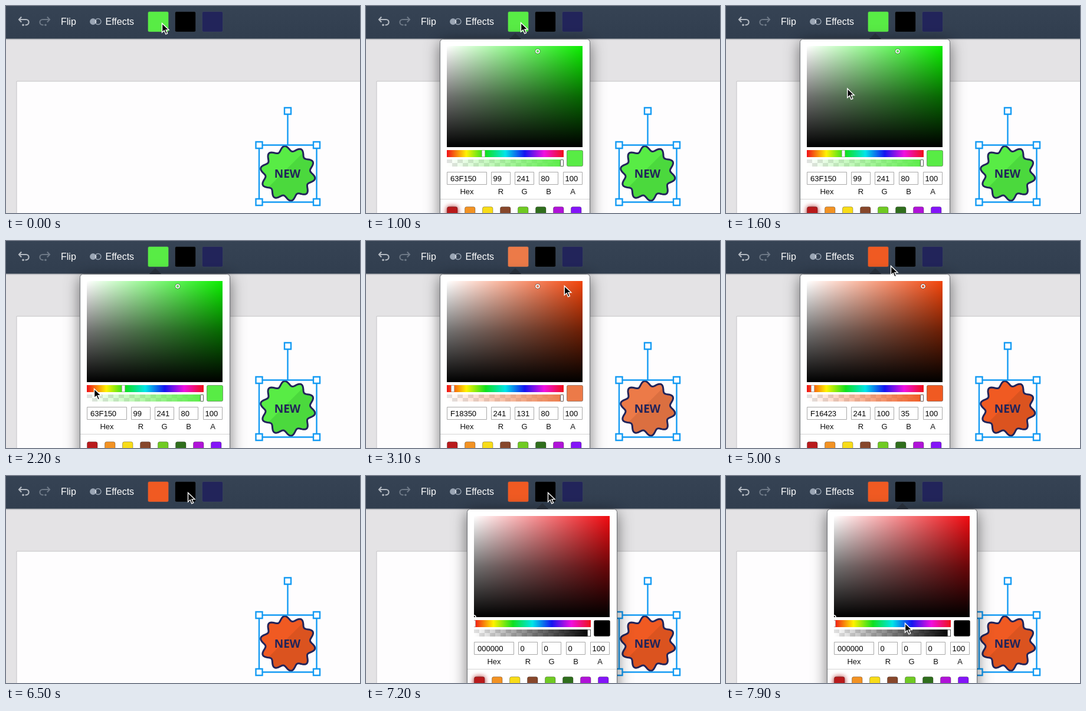
Animation, 600 px wide and 352 px high, one loop 8000 ms. Source, as an HTML page with a canvas:

```html
<!DOCTYPE html>
<html lang="en">
<head>
<meta charset="utf-8">
<title>Colour picker</title>
<style>
html, body { margin: 0; width: 100%; height: 100%; overflow: hidden; background: #e4e3e5; }
canvas { display: block; }
</style>
</head>
<body>
<canvas id="stage" width="600" height="352"></canvas>
<script>
const c = document.getElementById('stage').getContext('2d');
const LOOP = 8000, SANS = '"Liberation Sans", Arial, sans-serif';
const NAVY = '#22245a', BLUE = '#129af3';

// Pointer stops: time, x, y
const path = [
  [0, 264, 29], [200, 264, 29], [500, 262, 28], [1200, 262, 28], [2000, 149, 251],
  [2500, 149, 251], [3050, 336, 76], [3300, 334, 76], [4200, 334, 76], [4900, 279, 42],
  [5500, 279, 42], [6300, 308, 28], [7300, 308, 28], [7900, 303, 250], [8000, 303, 250]
];

// Colour states: hex shown, rgb, painted fill, shaded fill, pure hue, ring and hue thumb
const green = { hex: '63F150', rgb: [99, 241, 80], fill: '#58ec45', shade: '#4bd93d',
  hue: '#0cee00', ring: [154, 9], thumb: 62 };
const peach = { hex: 'F18350', rgb: [241, 131, 80], fill: '#ec7a48', shade: '#db6f40',
  hue: '#f2440a', ring: [154, 9], thumb: 10 };
const orange = { hex: 'F16423', rgb: [241, 100, 35], fill: '#f05a22', shade: '#db531f',
  hue: '#f2440a', ring: [197, 9], thumb: 10 };
const black = { hex: '000000', rgb: [0, 0, 0], fill: '#000', hue: '#f00a10', ring: [0, 172], thumb: 0 };
const presets = ['#b91a1c', '#f29223', '#f8dc18', '#87472b', '#6fca22', '#2f6e1c', '#b012d8', '#8414f8'];

function box(x, y, w, h, fill, stroke, r = 0, line = 1) {
  c.beginPath();
  c.roundRect(x, y, w, h, r);
  if (fill) { c.fillStyle = fill; c.fill(); }
  if (stroke) { c.strokeStyle = stroke; c.lineWidth = line; c.stroke(); }
}

function label(s, x, y, size, fill, align = 'left', font = SANS) {
  c.font = size + 'px ' + font;
  c.textAlign = align;
  c.fillStyle = fill;
  c.fillText(s, x, y);
}

function ramp(x0, y0, x1, y1, colours) {
  const g = c.createLinearGradient(x0, y0, x1, y1);
  colours.forEach((k, i) => g.addColorStop(i / (colours.length - 1), k));
  return g;
}

function svg(d, stroke, line, fill) {
  const p = new Path2D(d);
  c.lineWidth = line;
  c.strokeStyle = stroke;
  if (fill) { c.fillStyle = fill; c.fill(p); }
  c.stroke(p);
}

function circle(x, y, r, stroke, line, fill) {
  c.beginPath();
  c.arc(x, y, r, 0, 7);
  if (fill) { c.fillStyle = fill; c.fill(); }
  if (stroke) { c.strokeStyle = stroke; c.lineWidth = line; c.stroke(); }
}

function undo(colour) {
  svg('M26.2 18.5L22 23L26.2 27.5M22.5 23H34A4.6 4.6 0 0 1 34 32.2H32.5', colour, 2.1);
  circle(29, 32.2, 1.8, null, 0, colour);
}

function effects() {
  circle(147.5, 26.5, 5.4, null, 0, '#9aa5b4');
  circle(156, 26.5, 5, '#9aa5b4', 1.3, '#354253');
  c.save();
  c.beginPath();
  c.arc(156, 26.5, 5, 0, 7);
  c.clip();
  circle(147.5, 26.5, 5.4, '#9aa5b4', 1.3);
  c.restore();
  svg('M151.8 24V29', '#e1e5ea', 1.4);
}

function toolbar(main) {
  box(0, 55, 600, 3, ramp(0, 55, 0, 58, ['#8c9097', '#e4e3e5']));
  box(0, 0, 600, 55.5, ramp(0, 0, 0, 55, ['#364354', '#313e4f']));
  undo('#b4bac2');
  c.save();
  c.translate(96, 0);
  c.scale(-1, 1);
  undo('#6d7886');
  c.restore();
  label('Flip', 93, 32, 16, '#fff');
  label('Effects', 168.5, 32, 16, '#fff');
  effects();
  [main, '#000', NAVY].forEach((k, i) =>
    box(240.5 + i * 46, 9.5, 35, 34.5, k, 'rgba(70,80,95,.45)', 2.5));
}

function badge(col) {
  const p = new Path2D();
  for (let i = 0; i < 200; i++) {
    const a = i * Math.PI / 100, r = 42.4 + 4.4 * Math.cos(10 * (a + 97 * Math.PI / 180));
    p.lineTo(477.7 + r * Math.cos(a), 284.7 + r * Math.sin(a));
  }
  p.closePath();
  c.fillStyle = col.shade;
  c.fill(p);
  c.save();
  c.clip(p);
  c.beginPath();
  c.moveTo(420, 220);
  c.lineTo(533, 220);
  c.lineTo(420, 333);
  c.fillStyle = col.fill;
  c.fill();
  c.restore();
  c.strokeStyle = NAVY;
  c.lineWidth = 3;
  c.stroke(p);
  label('NEW', 477, 292, 'bold 19', NAVY, 'center', '"Open Sans", sans-serif');
}

function selection() {
  box(429, 236.5, 97.5, 97, null, BLUE, 0, 2.4);
  svg('M477.5 184V236', BLUE, 2.4);
  for (const [x, y] of [[477.5, 178.5], [429, 236.5], [526.5, 236.5], [429, 333.5], [526.5, 333.5]])
    box(x - 5.5, y - 5.5, 11, 11, '#fff', BLUE, 0, 2.4);
}

function thumb(x, y, edge) {
  box(x - 2.5, y, 5, 11, '#fff', edge, 1);
}

function picker(x, col, focus) {
  c.save();
  c.translate(x, 0);
  svg('M118 56L128 46L138 56Z', 'transparent', 0, '#2a333f');
  c.shadowColor = 'rgba(0,0,0,.55)';
  c.shadowBlur = 26;
  c.shadowOffsetY = 5;
  box(.5, 56.5, 254, 320, '#fff', null, 5);
  c.shadowColor = 'transparent';
  box(.5, 56.5, 254, 320, null, '#6a6d72', 5);

  c.save();
  c.beginPath();
  c.rect(12, 68, 230, 172);
  c.clip();
  box(12, 68, 230, 172, ramp(12, 0, 242, 0, ['#fff', col.hue]));
  box(12, 68, 230, 172, ramp(0, 68, 0, 240, ['rgba(0,0,0,0)', 'rgba(0,0,0,.56)', '#000']));
  circle(12 + col.ring[0], 68 + col.ring[1], 4, '#333', 1);
  circle(12 + col.ring[0], 68 + col.ring[1], 3, '#fff', 1.6);
  c.restore();

  c.save();
  c.beginPath();
  c.rect(12, 245, 199, 29);
  c.clip();
  box(12, 245, 198, 12, ramp(12, 0, 210, 0, ['#f01018', '#fff200', '#10e020', '#00e5e8', '#1414f0', '#f010e0', '#f01018']));
  thumb(12 + col.thumb, 245.5, '#aaa');
  for (let i = 0; i < 22; i++) box(12 + i * 9, 261 + i % 2 * 6, 9, 6, '#e2e2e2');
  const [r, g, b] = col.rgb;
  box(12, 261, 198, 12, ramp(12, 0, 210, 0, [`rgba(${r},${g},${b},0)`, col.fill]));
  thumb(207, 261.5, '#555');
  c.restore();
  box(215.5, 245.5, 27, 27, col.fill, 'rgba(0,0,0,.35)', 2);

  const fields = [['Hex', col.hex, 12, 68], ['R', r, 87, 33], ['G', g, 127, 33], ['B', b, 168, 33], ['A', 100, 209, 33]];
  for (const [name, value, fx, w] of fields) {
    box(fx + .5, 282.5, w - 1, 21, '#fff', '#a9a9a9');
    label(value, fx + (w > 40 ? 6 : 3.5), 298, 13, '#000');
    label(name, fx + w / 2, 320, 13, '#111', 'center');
  }
  box(1, 328, 253, 1, '#d4d4d4');
  presets.forEach((k, i) => {
    if (focus && !i) {
      c.shadowColor = '#b01818';
      c.shadowBlur = 8;
      c.shadowOffsetY = 0;
    }
    box(12.5 + i * 30, 341.5, 17.5, 17, k, 'rgba(0,0,0,.3)', 3);
    c.shadowColor = 'transparent';
  });
  c.restore();
}

function pointer(t) {
  const i = path.findIndex(p => p[0] > t), [t0, x0, y0] = path[i - 1], [t1, x1, y1] = path[i];
  const u = (t - t0) / (t1 - t0), e = u * u * (3 - 2 * u);
  c.save();
  c.translate(x0 + (x1 - x0) * e, y0 + (y1 - y0) * e);
  svg('M.5 .5V16L4.2 12.6L6.8 18.8L9.6 17.6L7 11.6H12Z', '#fff', 1.4, '#000');
  c.restore();
}

function draw(t) {
  const col = t < 2300 ? green : t < 3300 ? peach : orange;
  c.fillStyle = '#e4e3e5';
  c.fillRect(0, 0, 600, 352);
  box(18, 128, 600, 300, '#fefdfe', '#c4c3c5');
  badge(col);
  selection();
  toolbar(col.fill);
  if (t >= 500 && t < 5200) picker(125, col, t < 2100);
  if (t >= 6900) picker(171, black, true);
  pointer(t);
}

const start = performance.now();
function tick() {
  draw((performance.now() - start) % LOOP);
  requestAnimationFrame(tick);
}
tick();
</script>
</body>
</html>
```
